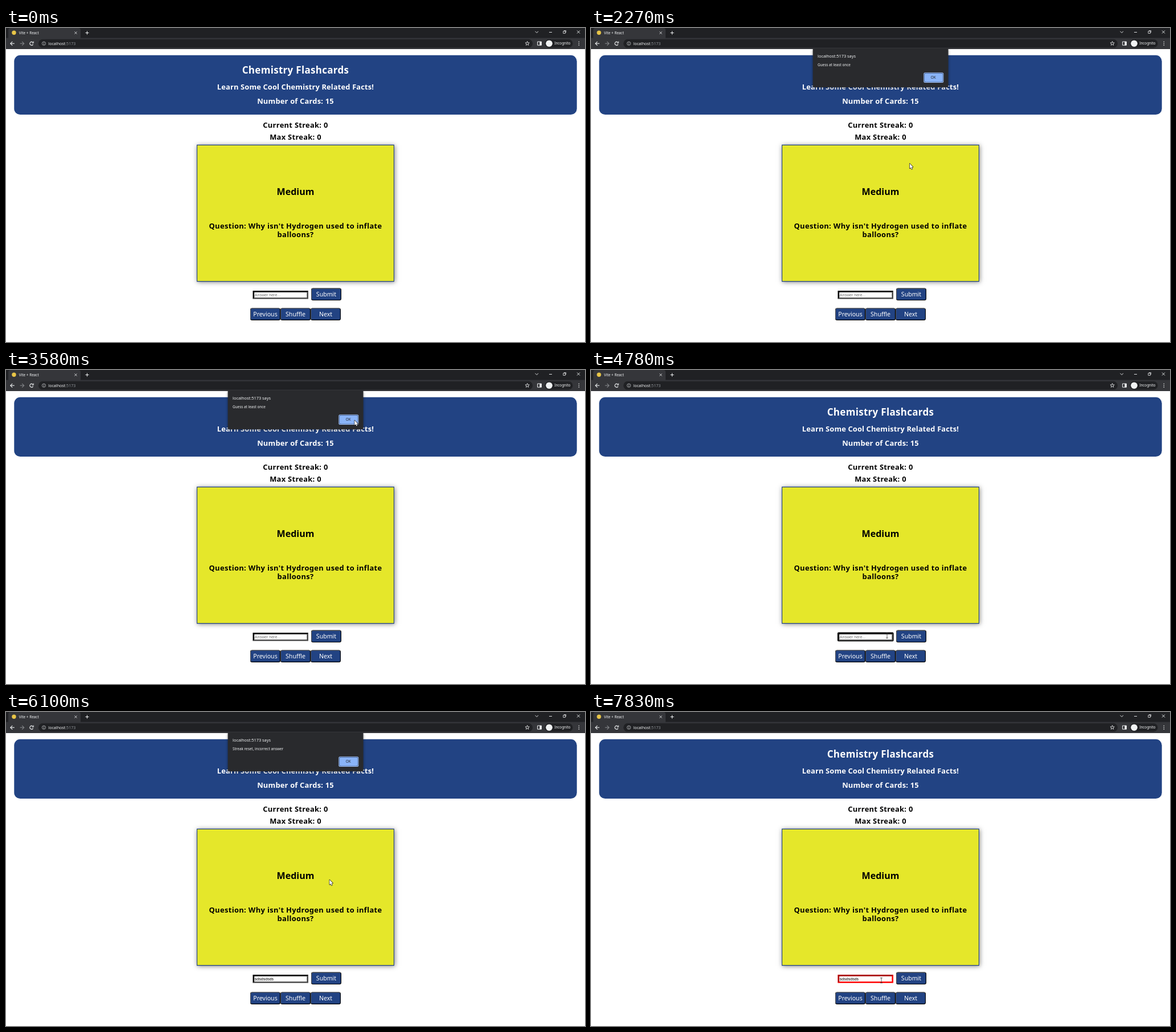
Recreate the animation shown at these times as an HTML page with a canvas. Size 1017 by 551 pixels, loop 8000 ms.

```html
<!DOCTYPE html>
<html lang="en">
<head>
<meta charset="utf-8">
<title>Chemistry Flashcards</title>
<style>
html, body { margin: 0; width: 100%; height: 100%; overflow: hidden; background: #fff; }
canvas { display: block; width: 1017px; height: 551px; }
</style>
</head>
<body>
<canvas id="stage"></canvas>
<script>
const W = 1017, H = 551, MID = W / 2, LOOP = 8000;
const BLUE = '#224383', YELLOW = '#e5e72a', BAR = '#35363a', DARK = '#202124', INK = '#f1f3f4';
const UI = '"Noto Sans", "Open Sans", sans-serif';
const FIELD = '"Liberation Sans", Arial, sans-serif';
const ANSWER = 'sdsdsdsds';

const canvas = document.getElementById('stage');
const ctx = canvas.getContext('2d');
const dpr = window.devicePixelRatio || 1;
canvas.width = Math.round(W * dpr);
canvas.height = Math.round(H * dpr);

// The pointer's trips: start, end, and the place reached
const TRIPS = [
  [160, 410, 450, 296],
  [670, 710, 455, 309],
  [910, 1150, 454.5, 299.5],
  [1930, 2270, 559.5, 237.5],
  [2270, 2730, 630, 218],
  [2760, 3540, 612, 88],
  [3700, 4350, 520, 466],
  [5420, 5610, 556, 467],
  [5750, 6100, 568, 294],
  [6100, 6470, 604, 86],
  [6620, 7360, 570, 464],
  [7400, 7830, 510, 471]
];

const within = (t, a, b) => t >= a && t < b;
const clamp = v => Math.max(0, Math.min(1, v));
const smooth = k => k * k * (3 - 2 * k);

function pointerAt(t) {
  let x = 0, y = 215;
  for (const [start, end, toX, toY] of TRIPS) {
    const k = smooth(clamp((t - start) / (end - start)));
    x += (toX - x) * k;
    y += (toY - y) * k;
  }
  return [x, y];
}

function box(x, y, w, h, color, r = 0) {
  ctx.fillStyle = color;
  ctx.beginPath();
  ctx.roundRect(x, y, w, h, r);
  ctx.fill();
}

function frame(x, y, w, h, color, width, r = 0) {
  ctx.strokeStyle = color;
  ctx.lineWidth = width;
  ctx.beginPath();
  ctx.roundRect(x, y, w, h, r);
  ctx.stroke();
}

function disc(x, y, r, color) {
  box(x - r, y - r, 2 * r, 2 * r, color, r);
}

function line(points, color, width, close) {
  ctx.beginPath();
  points.forEach(([x, y]) => ctx.lineTo(x, y));
  if (close) ctx.closePath();
  ctx.strokeStyle = color;
  ctx.lineWidth = width;
  ctx.stroke();
}

function text(str, x, y, font, color, align = 'left', spacing = 0) {
  ctx.font = font;
  ctx.fillStyle = color;
  ctx.textAlign = align;
  ctx.letterSpacing = spacing + 'px';
  ctx.fillText(str, x, y);
  ctx.letterSpacing = '0px';
}

function shadow(blur, dx, dy, alpha) {
  ctx.shadowColor = `rgba(0,0,0,${alpha})`;
  ctx.shadowBlur = blur * dpr;
  ctx.shadowOffsetX = dx * dpr;
  ctx.shadowOffsetY = dy * dpr;
}

// A box whose border has one colour above and left, another below and right
function bevel(x, y, w, h, border, r, topLeft, bottomRight, fill) {
  box(x, y, w, h, bottomRight, r);
  ctx.save();
  ctx.beginPath();
  ctx.moveTo(x, y + h);
  ctx.lineTo(x, y);
  ctx.lineTo(x + w, y);
  ctx.lineTo(x + w - h / 2, y + h / 2);
  ctx.lineTo(x + h / 2, y + h / 2);
  ctx.clip();
  box(x, y, w, h, topLeft, r);
  ctx.restore();
  box(x + border, y + border, w - 2 * border, h - 2 * border, fill, Math.max(0, r - border));
}

function cross(x, y, r, color) {
  line([[x - r, y - r], [x + r, y + r]], color, 0.9);
  line([[x + r, y - r], [x - r, y + r]], color, 0.9);
}

function arrow(x, y, dir, color) {
  line([[x - 3.5, y], [x + 3.5, y]], color, 1.1);
  line([[x, y - 3.4], [x + dir * 3.5, y], [x, y + 3.4]], color, 1.1);
}

function drawTabs(active) {
  box(0, 0, W, 18, active ? DARK : '#3c4043');
  box(4, 0, 127, 18, BAR, [4, 4, 0, 0]);
  disc(14, 8.2, 3.7, '#e8c547');
  text('Vite + React', 22.8, 10.7, '6.4px ' + UI, INK);
  cross(122.5, 8.5, 2, INK);
  line([[139.5, 8.5], [145.5, 8.5]], INK, 1);
  line([[142.5, 5.5], [142.5, 11.5]], INK, 1);

  const ink = active ? INK : '#96999c';
  line([[929.5, 5.8], [932.2, 8.5], [935, 5.8]], ink, 0.9);
  line([[954, 7.5], [959, 7.5]], ink, 0.9);
  frame(978.8, 5.6, 3.6, 3.8, ink, 0.8);
  line([[980, 4.5], [983.6, 4.5], [983.6, 8.2]], ink, 0.7);
  cross(1005.5, 7, 2.5, ink);
}

function drawToolbar() {
  const y = 27.2;
  box(0, 17.5, W, 19.5, BAR);
  arrow(11.3, y, -1, INK);
  arrow(28.2, y, 1, '#85878a');
  ctx.strokeStyle = INK;
  ctx.lineWidth = 1.1;
  ctx.beginPath();
  ctx.arc(45, y, 3, 0.5, 5.5);
  ctx.stroke();
  line([[48.3, 23.5], [48.3, 26.3], [45.5, 26.3]], INK, 1);

  box(57, 19.8, 868, 14.8, DARK, 7.4);
  frame(63.4, y - 3.1, 6.2, 6.2, '#c4c7ca', 0.8, 3.1);
  box(66.1, 26.7, 0.9, 2.3, '#c4c7ca');
  box(66.1, 25.2, 0.9, 0.9, '#c4c7ca');
  text('localhost', 74.3, 29.8, '7.1px ' + UI, INK);
  text(':5173', 104.2, 29.8, '7.1px ' + UI, '#8f9398');

  const star = Array.from({ length: 10 }, (_, i) => {
    const a = (i / 5 - 0.5) * Math.PI, r = i % 2 ? 1.6 : 3.8;
    return [915.7 + r * Math.cos(a), y + r * Math.sin(a)];
  });
  line(star, INK, 0.8, true);

  frame(933.6, 24, 6.8, 6.2, INK, 1);
  box(937.4, 24, 3, 6.2, INK);
  box(946.5, 19.9, 49, 14.6, DARK, 7.3);
  disc(954, y, 5.8, INK);
  text('Incognito', 963.3, 29.4, '6.3px ' + UI, INK);
  for (const dy of [-2.9, 0, 2.9]) disc(1006.3, y + dy, 0.8, INK);
}

function button(x, y, label) {
  bevel(x, y, 53, 21.4, 1.06, 3.2, '#4c4c4c', '#000', BLUE);
  text(label, x + 26.5, y + 14.5, '500 10.6px ' + UI, '#fff', 'center');
}

function drawPage() {
  const title = 'bold 17px ' + UI, body = 'bold 12.9px ' + UI;
  box(0, 37, W, H - 37, '#fff');
  box(14.3, 47.8, W - 28.6, 104.2, BLUE, 10.6);
  text('Chemistry Flashcards', MID, 80, title, '#fff', 'center', 0.3);
  text('Learn Some Cool Chemistry Related Facts!', MID, 107.7, body, '#fff', 'center', 0.14);
  text('Number of Cards: 15', MID, 133.1, body, '#fff', 'center', 0.2);
  text('Current Streak: 0', MID, 175.2, body, '#000', 'center', 0.3);
  text('Max Streak: 0', MID, 195.9, body, '#000', 'center', 0.3);

  ctx.save();
  shadow(8, 1, 1, 0.5);
  box(335, 204.8, 347, 240.4, BLUE);
  ctx.restore();
  box(336.1, 205.9, 344.8, 238.2, YELLOW);
  text('Medium', MID, 293, 'bold 16px ' + UI, '#000', 'center');
  text("Question: Why isn't Hydrogen used to inflate", MID, 352, body, '#000', 'center', 0.36);
  text('balloons?', MID, 367.3, body, '#000', 'center', 0.36);

  button(536, 456.6, 'Submit');
  ['Previous', 'Shuffle', 'Next'].forEach((label, i) => button(429 + 53 * i, 491.5, label));
}

function drawField(t) {
  const x = 433.5, y = 461, w = 97.5, h = 14.6;
  const wrong = t >= 6620;
  bevel(x, y, w, h, 2.65, 0, wrong ? '#ab0000' : '#000', wrong ? '#f00' : '#4c4c4c', '#fff');
  if (within(t, 4280, 5750)) frame(x, y, w, h, '#101010', 1.4, 1.6);

  const typed = ANSWER.slice(0, Math.max(0, Math.ceil((t - 4950) / 50)));
  text(typed || 'Answer here...', 436.8, 471, '7.06px ' + FIELD, typed ? '#000' : '#757575');
  if (within(t, 4280, 4780) || within(t, 4950, 5750)) {
    box(437 + ctx.measureText(typed).width, 464.3, 0.7, 8.2, '#000');
  }
}

function drawDialog(message) {
  ctx.save();
  shadow(4, 0, 1, 0.45);
  box(389.7, 36.5, 237.8, 67.5, '#292a2d', [0, 0, 2, 2]);
  ctx.restore();
  text('localhost:5173 says', 398, 52.2, '7.4px ' + UI, INK);
  text(message, 398, 67.3, '6.4px ' + UI, INK);
  box(584.3, 78.2, 35, 17.8, '#a9c8fa', 2.5);
  box(585.2, 79.1, 33.2, 16, '#35507f', 2);
  box(585.9, 79.8, 31.8, 14.6, '#8ab4f8', 1.8);
  text('OK', 601.3, 89.2, '6.4px ' + UI, DARK, 'center');
}

const ARROW = new Path2D('M.3 .3V9l1.9-1.8 1.5 3.2 1.3-.6-1.4-3.1 2.6-.2z');
const HAND = new Path2D();
HAND.roundRect(-1, 0, 2, 8, 1);
HAND.roundRect(-2.8, 4.2, 7.6, 6.8, 2);

const BEAM = new Path2D('M-2-4.4H2M0-4.4V4.4M-2 4.4H2');

function drawPointer(t, dialog) {
  const [x, y] = pointerAt(t);
  const over = (left, top, right, bottom) => !dialog && within(x, left, right) && within(y, top, bottom);
  const beam = over(433, 461, 531, 476);
  const hand = over(536, 456, 589, 478) || over(429, 491, 588, 513);
  const shape = beam ? BEAM : hand ? HAND : ARROW;
  ctx.save();
  ctx.translate(x, y);
  ctx.lineJoin = 'round';
  ctx.lineWidth = beam ? 0.8 : 1.2;
  ctx.strokeStyle = beam ? '#333' : '#000';
  ctx.stroke(shape);
  ctx.fillStyle = '#fff';
  if (!beam) ctx.fill(shape);
  ctx.restore();
}

function draw() {
  const t = performance.now() % LOOP;
  const dialog = within(t, 1930, 3700) ? 'Guess at least once'
    : within(t, 5750, 6620) ? 'Streak reset, incorrect answer' : '';
  ctx.setTransform(dpr, 0, 0, dpr, 0, 0);
  drawPage();
  drawField(t);
  drawTabs(!within(t, 160, 1930));
  drawToolbar();
  if (dialog) drawDialog(dialog);
  if (t >= 160) drawPointer(t, dialog);
  requestAnimationFrame(draw);
}
draw();
</script>
</body>
</html>
```
